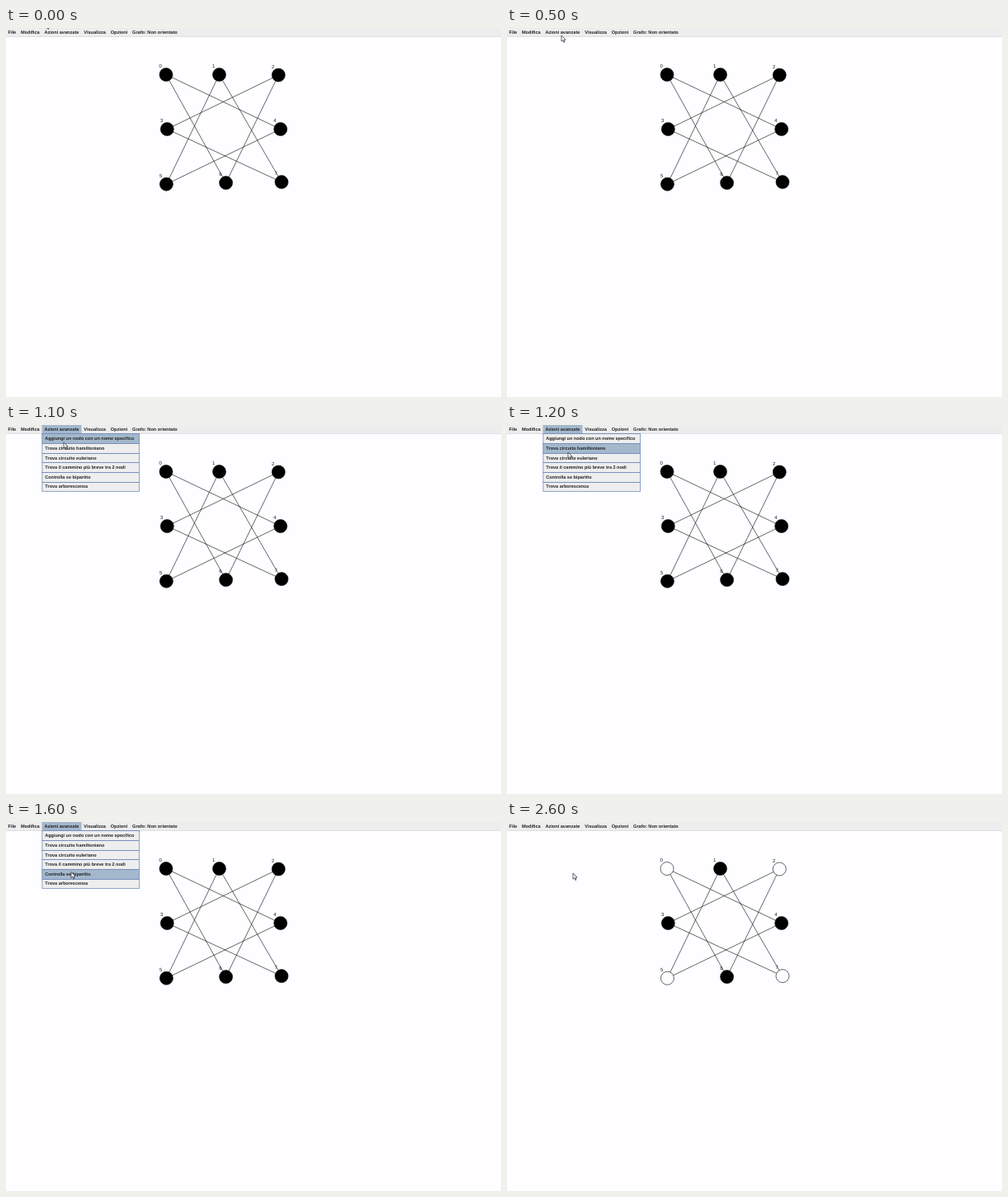
These frames come from a looping animation (600 px wide and 447 px high, 2.7 s). An HTML page with a canvas:

```html
<!DOCTYPE html>
<html lang="it">
<head>
<meta charset="utf-8">
<title>Grafo bipartito</title>
<style>
  html, body { margin: 0; width: 100%; height: 100%; overflow: hidden; background: #fefdff; }
  canvas { display: block; width: 100vw; height: 100vh; }
</style>
</head>
<body>
<canvas id="stage" width="600" height="447"></canvas>
<script>
const ctx = document.getElementById('stage').getContext('2d');
const LOOP = 2700, STEP = 100;
const OPEN_AT = 600, CLOSE_AT = 2100;
const FONT = '"Liberation Sans", Arial, sans-serif';
const PAPER = '#fefdff', PANEL = '#eeeeee', SELECTED = '#a3b8cc', BORDER = '#7890bd';

const titles = ['File', 'Modifica', 'Azioni avanzate', 'Visualizza', 'Opzioni', 'Grafo: Non orientato'];
const items = [
  'Aggiungi un nodo con un nome specifico',
  'Trova circuito hamiltoniano',
  'Trova circuito euleriano',
  'Trova il cammino più breve tra 2 nodi',
  'Controlla se bipartito',
  'Trova arborescenza'
];
const menu = { x: 43.5, y: 10.4, w: 118.3, row: 11.65 };

// Hand-placed nodes, roughly a 3 by 3 board without its centre
const nodes = [
  [194, 56.5], [258.5, 56.5], [330.3, 57],
  [195.3, 122.5], [332.7, 122.5],
  [194.4, 189.2], [266.6, 187.6], [334, 186.6]
].map(([x, y], i) => {
  const cell = i < 4 ? i : i + 1;
  return { x, y, col: cell % 3, row: Math.floor(cell / 3) };
});
const isLight = n => (n.col + n.row) % 2 === 0;
const knightMove = (a, b) => Math.abs((a.col - b.col) * (a.row - b.row)) === 2;

// Pointer tip: time, x, y
const path = [
  [0, 48, -7], [400, 66, 8], [500, 66, 9], [1000, 66, 9],
  [1200, 74, 33], [1500, 79, 60.5], [2500, 79, 61], [2600, 80, 62]
];

function pointerAt(t) {
  const i = Math.max(1, path.findIndex(p => p[0] >= t));
  const [t0, x0, y0] = path[i - 1], [t1, x1, y1] = path[i];
  const k = (t - t0) / (t1 - t0);
  return [x0 + (x1 - x0) * k, y0 + (y1 - y0) * k];
}

function rect(x, y, w, h, color) {
  ctx.fillStyle = color;
  ctx.fillRect(x, y, w, h);
}

function text(str, x, y, size, weight = 'bold') {
  ctx.font = `${weight} ${size}px ${FONT}`;
  ctx.fillStyle = '#222';
  ctx.fillText(str, x, y);
  return ctx.measureText(str).width;
}

function drawGraph(colored) {
  ctx.strokeStyle = '#000';
  ctx.lineWidth = 0.6;
  ctx.beginPath();
  nodes.forEach((a, i) => {
    for (const b of nodes.slice(i + 1)) {
      if (!knightMove(a, b)) continue;
      ctx.moveTo(a.x, a.y);
      ctx.lineTo(b.x, b.y);
    }
  });
  ctx.stroke();
  for (const n of nodes) {
    ctx.beginPath();
    ctx.arc(n.x, n.y, 8, 0, Math.PI * 2);
    ctx.fillStyle = colored && isLight(n) ? PAPER : '#000';
    ctx.fill();
    ctx.stroke();
  }
  nodes.forEach((n, i) => text(i, n.x - 8.4, n.y - 8.2, 6, 'normal'));
}

function drawBar(open) {
  rect(0, 0, 600, 10, '#ededee');
  rect(0, 10, 600, 1, '#e0e0e2');
  if (open) rect(menu.x, 0, 48, menu.y, SELECTED);
  let x = 2.5;
  for (const title of titles) x += text(title, x, 7.2, 5.6) + 5.8;
}

function drawMenu(active) {
  const { x, y, w, row } = menu;
  const edge = i => Math.round(y + i * row);
  const top = edge(0), bottom = edge(items.length);
  rect(x, top, w, bottom - top, PANEL);
  items.forEach((str, i) => {
    if (i === active) rect(x, edge(i), w, edge(i + 1) - edge(i), SELECTED);
    rect(x, edge(i), w, 1, BORDER);
    text(str, x + 3.7, y + i * row + 7.8, 5.5);
  });
  rect(x, bottom, w, 0.8, BORDER);
  rect(x, top, 0.8, bottom - top, BORDER);
  rect(x + w - 0.8, top, 0.8, bottom - top, BORDER);
}

function drawPointer(x, y) {
  ctx.save();
  ctx.translate(x, y);
  const arrow = new Path2D('M0 0V7.2L1.7 5.8L2.9 8.5L4 8L2.9 5.4L5 5.2Z');
  ctx.fillStyle = '#fff';
  ctx.fill(arrow);
  ctx.strokeStyle = '#222';
  ctx.lineWidth = 0.7;
  ctx.stroke(arrow);
  ctx.restore();
}

function draw(time) {
  const t = Math.floor((time % LOOP) / STEP) * STEP;
  const open = t >= OPEN_AT && t < CLOSE_AT;
  const [px, py] = pointerAt(t);
  rect(0, 0, 600, 447, PAPER);
  drawGraph(t >= CLOSE_AT);
  drawBar(open);
  if (open) drawMenu(Math.floor((py - menu.y) / menu.row));
  drawPointer(px, py);
}

ctx.textRendering = 'geometricPrecision';
ctx.fontKerning = 'none';
const start = performance.now();
function tick() {
  draw(performance.now() - start);
  requestAnimationFrame(tick);
}
tick();
</script>
</body>
</html>
```
